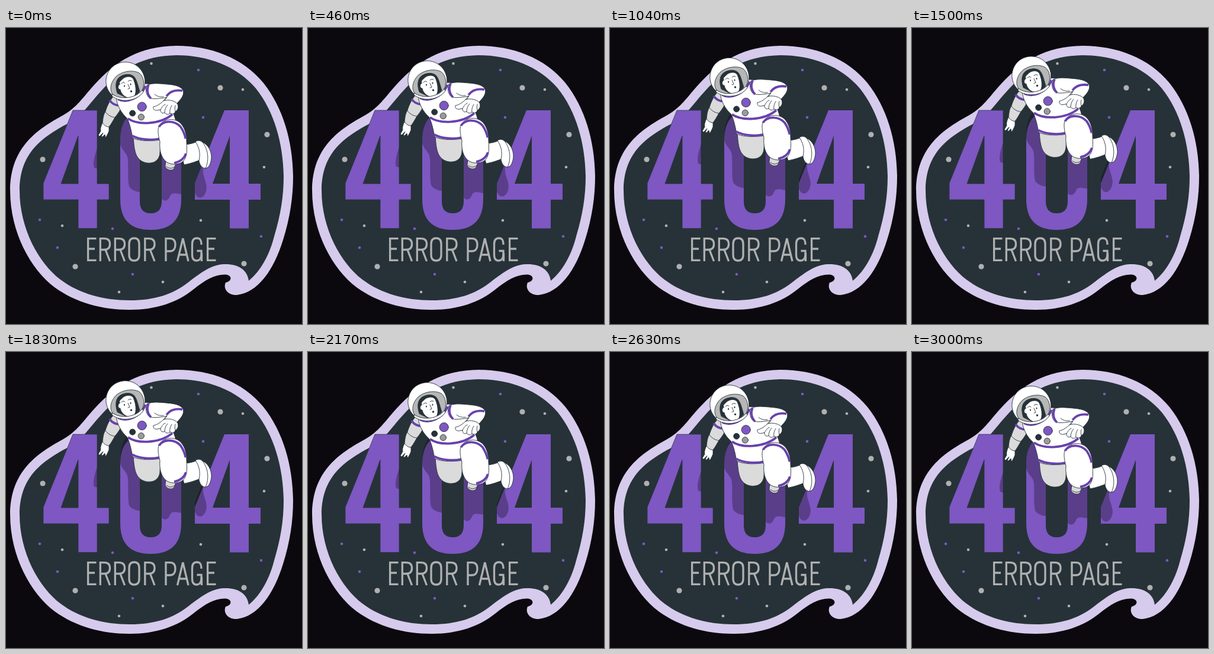
Write an HTML page that moves like this. It is 500 px wide and 500 px high and loops after 3040 ms.

```html
<!DOCTYPE html>
<html lang="en">
<head>
<meta charset="utf-8">
<title>404 ERROR PAGE</title>
<style>
  html, body { margin: 0; width: 100%; height: 100%; overflow: hidden; background: #0b090e; }
  svg { display: block; width: 100vw; height: 100vh; }
  .suit > * { stroke: #263238; stroke-width: .9; stroke-linejoin: round; stroke-linecap: round; }
  .w { fill: #fff; }
  .g { fill: #dbdbdb; }
  .d { fill: #263238; }
  .p { fill: #7e57c2; }
  .n { fill: none; }
  .suit .band { fill: none; stroke: #6841ad; stroke-width: 3.8; stroke-linecap: butt; }
  .letters { fill: none; stroke: #b0b0b0; stroke-width: 3.3; stroke-linejoin: miter; }
</style>
</head>
<body>
<svg viewBox="0 0 500 500" role="img" aria-label="404 ERROR PAGE">
  <defs>
    <path id="four" clip-rule="evenodd" fill-rule="evenodd"
      d="M113 139H154V263H174V290H154V338.500H122V290H63V262ZM122 182L93 263H122Z"/>
    <path id="zero" clip-rule="evenodd" fill-rule="evenodd"
      d="M193 190C193 155 209 137 244.500 137S296 155 296 190V289C296 323 280 341 244.500 341S193 323 193 289ZM226 186V293C226 306 232 313 244.500 313S263 306 263 293V186C263 172 257 165 244.500 165S226 172 226 186Z"/>
    <clipPath id="digits">
      <use href="#four"/><use href="#zero"/><use href="#four" x="256"/>
    </clipPath>
  </defs>

  <path fill="#d6cbec" d="M288 30C225 31 187 55 150 95C130 117 120 134 97 147C55 170 7 200 7 275C7 345 42 408 82 438C118 464 162 476 209 476C254 476 290 463 316 442C337 425 352 417 369 416.500C381 416 384 427 371 430C366 441 376 452 390 451C425 447 452 410 468 358C480 320 485 285 485 250C484 190 468 135 435 93C400 50 345 30 288 30Z"/>
  <path class="d" d="M288 46C232 47 196 67 161 106C138 131 130 147 105 161C62 184 23 210 23 275C23 338 55 397 92 425C124 449 165 460 209 460C251 460 281 450 306 431C326 416 345 400 368 399C391 398 408 408 410 427C432 409 446 380 453 352C464 315 469 285 469 250C468 194 453 141 422 102C390 64 340 46 288 46Z"/>
  <g id="stars"></g>

  <g class="p">
    <use href="#four" stroke="#263238" stroke-width=".7"/>
    <use href="#zero"/>
    <use href="#four" x="256"/>
  </g>

  <g class="letters">
    <path id="e" d="M152.500 355.600H138.600V392.400H152.500M138.600 373H150"/>
    <path id="r" d="M159.300 394V355.600H166C173 355.600 175.500 359 175.500 365S173 374.500 166 374.500H159.300M168 374.500L175.500 394"/>
    <use href="#r" x="25"/>
    <path d="M208 365C208 358 211 355 216.500 355S225 358 225 365V383C225 390 222 393 216.500 393S208 390 208 383Z"/>
    <use href="#r" x="75.500"/>
    <path d="M270 394V355.600H277C283.500 355.600 286 360 286 366S283.500 377 277 377H270"/>
    <path d="M289.500 394L298.800 355.500L308 394M292.500 383H305"/>
    <path d="M330 366C330 358 328 355 322.500 355S314.500 358 314.500 365V383C314.500 390 317 393 322 393S330 389 330 382V376.500H322.500M330.500 380V394"/>
    <use href="#e" x="202"/>
  </g>

  <!-- the shadow is cut to the digits first, then drifts as one piece -->
  <g class="float" clip-path="url(#digits)">
    <path opacity=".29" d="M156 198C150 213 146 228 149 236C154 239 160 237 164 228L183 192L193 150V196C195 208 206 210 206 224C207 238 205 255 208 268C213 275 222 277 230 278L258 276C261 287 264 292 269 291.500C276 291 276 284 279 281C285 277 291 281 300 281L318 276C321 285 325 287 329 286.500C336 285 340 274 338.500 266C337 254 330 247 334 232L300 150H200Z"/>
  </g>

  <g class="float suit">
    <!-- far arm -->
    <path class="w" d="M163 160L174 167L174 174C172 179 170 183 168 185L167 180L163 184L161 183L164 177L158 183L156 181L160 174C159 169 161 165 163 160Z"/>
    <path class="g" d="M182 115C176 121 171 131 168 141C164 147 164 154 163 160C166 165 170 167 174 167C178 162 181 156 184 151C189 145 193 139 196 132L192 116Z"/>
    <path class="n" d="M168 142C173 148 179 151 184 151"/>
    <path class="band" d="M175 122C179 128 186 131 193 131"/>

    <!-- far leg -->
    <path class="g" d="M270 226L287 226C286 234 284 240 279 240C274 240 271 238 269 234Z"/>
    <path class="n" d="M271 234C275 238 281 238 285 234"/>
    <path class="g" d="M215 184C216 198 217 210 222 218C228 227 239 230 249 227C256 224 260 218 260 210L262 184Z"/>

    <!-- lower leg and boot -->
    <path class="w" d="M292 196C304 198 314 196 325 191L330 222C320 226 312 229 301 231Z"/>
    <path class="w" d="M320 192C324 189 329 190 332 193C341 197 347 207 347 219C346 229 343 236 337 237C331 237 327 231 326 224C329 211 326 201 320 192Z"/>
    <path class="n" d="M332 193C341 204 344 222 337 237"/>

    <!-- torso -->
    <path class="w" d="M186 116C187 130 194 143 205 153C210 164 212 176 214 186C228 192 247 191 260 189L287 158C285 147 279 138 277 127L267 96L235 94Z"/>
    <path class="band" d="M206 153C222 164 259 164 281 146"/>
    <path class="band" d="M213 182C226 189 246 190 259 187"/>

    <!-- thigh -->
    <path class="w" d="M258 166C264 154 283 150 295 161C304 171 305 183 305 193C306 205 306 216 301 223C295 231 282 232 272 227C261 219 259 205 260 192C257 182 256 173 258 166Z"/>
    <path class="band" d="M258.500 167C266 155 285 156 295 167C299 173 302 180 303.500 187"/>
    <path class="band" d="M284 228C294 226 301 221 304 212"/>

    <!-- near arm -->
    <path class="w" d="M238 97C246 92 260 94 272 95C284 96 295 98 299 105C302 113 295 121 288 128L267 124L272 117C260 119 248 121 242 118C236 113 235 103 238 97Z"/>
    <path class="band" d="M241 96C237 104 239 113 245 119"/>
    <path class="band" d="M271 115C277 107 287 104 298 106"/>
    <path class="n" d="M266 116C260 117 254 115 251 112M272 116C268 119 266 123 266 126"/>
    <path class="w" d="M266 123C261 128 255 132 249 133C248 137 251 140 256 139L261 138C261 143 264 145 268 143C270 146 274 147 277 144C281 146 285 145 286 141C290 139 292 134 290 129C287 123 274 120 266 123Z"/>
    <path class="n" d="M261 138C263 134 266 130 269 129M268 143C268 138 270 133 273 130M277 144C276 139 278 134 280 131M286 141C285 137 285 134 286 131"/>

    <circle class="p" cx="229.700" cy="133" r="7.600"/>
    <circle class="d" cx="213.700" cy="144" r="5"/>
    <circle cx="228.300" cy="150.500" r="5.200" fill="#9b9b9b"/>

    <!-- helmet -->
    <path class="band" d="M189 120C204 128 226 119 236 98"/>
    <path class="w" d="M181 115C172 108 168 97 169 87C171 70 184 58 201 57.500C219 57.500 231 70 234 84C236 93 234 100 230 106C219 121 198 126 181 115Z"/>
    <path fill="#b7b7b7" d="M180 112C174 104 177 91 186 82C196 73 214 70 225 76C233 82 235 96 230 105C219 120 195 124 180 112Z"/>
    <path class="d" d="M188 110C184 98 185 87 193 82C201 77 212 77 217 83C222 90 223 99 226 107C222 113 214 118 206 119Z"/>
    <path class="w" d="M192 95C190 90 195 89 198 85C204 81 212 81 215 86C218 93 220 101 219 109C218 116 213 120 206 118C199 116 194 110 193 104C189 104 188 98 192 95Z"/>
    <path class="n" d="M195 94Q198 90 201 93M206 90Q209 87 212 89M206 95L209 102L206 103"/>
    <g class="d">
      <ellipse cx="200" cy="98" rx="1" ry="1.500" stroke="none"/>
      <ellipse cx="210.500" cy="95" rx="1" ry="1.500" stroke="none"/>
      <circle cx="211.500" cy="107" r="1.700" stroke="none"/>
    </g>
    <path class="w" d="M180 112C194 122 219 119 230 105L232 108C221 124 194 127 179 115Z"/>
  </g>
</svg>
<script>
  const LOOP = 3040, STEPS = 73, RISE = 9.6;
  const stars = [
    ['#b0b0b0', 4.6, [[362, 101], [441, 180], [62, 222], [117, 403], [402, 398]]],
    ['#b0b0b0', 2.3, [[245.5, 60], [400, 104], [436, 235], [95, 334], [191, 446], [265, 429], [329, 325]]],
    ['#7e57c2', 2.3, [[325, 71], [333, 151], [57, 324], [87, 371], [180, 339], [214, 416], [431, 352]]]
  ];
  document.getElementById('stars').innerHTML = stars.map(([fill, r, spots]) =>
    spots.map(([x, y]) => `<circle cx="${x}" cy="${y}" r="${r}" fill="${fill}"/>`).join('')
  ).join('');

  const floats = document.querySelectorAll('.float');
  const start = performance.now();

  function draw(now) {
    const t = Math.max(0, now - start) % LOOP;
    const phase = Math.floor(t / LOOP * STEPS) / STEPS;
    const y = -RISE * (1 - Math.cos(2 * Math.PI * phase)) / 2;
    floats.forEach(el => el.setAttribute('transform', `translate(0 ${y.toFixed(3)})`));
    requestAnimationFrame(draw);
  }
  draw(start);
</script>
</body>
</html>
```
